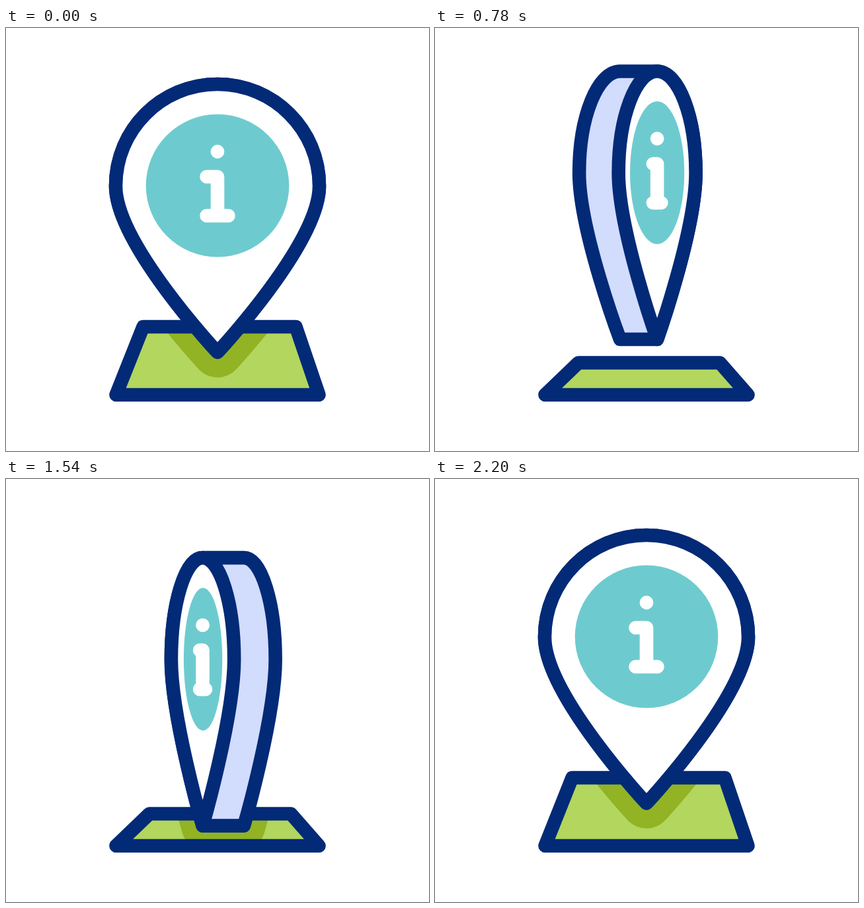
An HTML page with a canvas for the animation above (2400 ms loop, 640 by 640 pixels).

```html
<!DOCTYPE html>
<html lang="en">
<head>
<meta charset="utf-8">
<title>Turning map pin</title>
<style>
html, body { margin: 0; width: 100%; height: 100%; overflow: hidden; background: #fff; }
canvas { display: block; width: 640px; height: 640px; }
</style>
</head>
<body>
<canvas id="stage" width="640" height="640"></canvas>
<script>
const ctx = document.getElementById('stage').getContext('2d');
const LOOP = 2400, HALF = 1200;
const NAVY = '#032a77', TEAL = '#6dcbcf', GREEN = '#b2d65e', SHADE = '#91b324', SIDE = '#d2dcfd';
const TOP = 85, MID = 239, TIP = 490.5, RADIUS = 154, LINE = 20.6;

const mix = (a, b, p) => a + (b - a) * p;

function ease(t, from, to) {
  const p = Math.min(1, Math.max(0, (t - from) / (to - from)));
  return p * p * (3 - 2 * p);
}

// Smooth curve through [time, value] knots, flat at turning points and ends.
function through(knots, t) {
  const last = knots.length - 1;
  if (t <= knots[0][0]) return knots[0][1];
  if (t >= knots[last][0]) return knots[last][1];
  const slope = (i, j) => (knots[j][1] - knots[i][1]) / (knots[j][0] - knots[i][0]);
  const tangent = i => i > 0 && i < last && slope(i - 1, i) * slope(i, i + 1) > 0
    ? slope(i - 1, i + 1) : 0;
  const i = knots.findIndex(k => k[0] > t) - 1;
  const [t0, v0] = knots[i], [t1, v1] = knots[i + 1];
  const d = t1 - t0, u = (t - t0) / d, q = 1 - u;
  return mix(v0, v1, u * u * (3 - 2 * u)) + d * u * q * (q * tangent(i) - u * tangent(i + 1));
}

const FAR_LEFT = [[200, 320], [380, 310.5], [780, 280], [1100, 285], [1200, 290]];
const FAR_RIGHT = [[1200, 346], [1540, 360], [1820, 350], [2200, 320]];

// Drop outline: left half around x = l, right half around x = r.
function drop(l, lw, r, rw) {
  const path = new Path2D(), bend = 0.552, low = 326;
  const shoulder = MID - RADIUS * bend;
  path.moveTo(l, TIP);
  path.bezierCurveTo(l, TIP, l - lw, low, l - lw, MID);
  path.bezierCurveTo(l - lw, shoulder, l - lw * bend, TOP, l, TOP);
  path.lineTo(r, TOP);
  path.bezierCurveTo(r + rw * bend, TOP, r + rw, shoulder, r + rw, MID);
  path.bezierCurveTo(r + rw, low, r, TIP, r, TIP);
  path.closePath();
  return path;
}

function pinAt(t) {
  const first = t < HALF;
  const s = first ? 1 - ease(t, 200, HALF) : ease(t, HALF, 2200);
  const k = 1 - s;
  const wide = RADIUS * s + 10 * k - 83 * s ** 3 * k;
  const thin = 10 * k * (1 - ease(t, HALF, 1540));
  const x = first ? 320 + 26 * k : 320 - 30 * k - 10 * s * s * k;
  const discX = first ? x : 320 - 30 * k;
  const [l, lw, r, rw] = first
    ? [through(FAR_LEFT, t), wide, x, RADIUS * s]
    : [x, wide, through(FAR_RIGHT, t), wide - thin];
  return {
    s, x, discX,
    body: drop(l, lw, r, rw),
    shade: drop(l + 8 * k, lw, r - 8 * k, rw),
    face: first ? drop(x, rw, x, rw) : drop(x, wide, x, wide - 2 * thin)
  };
}

function liftAt(t) {
  if (t < 800) return -19.6 * ease(t, 200, 800);
  if (t < 1600) return mix(-19.6, 35, ease(t, 800, 1600));
  return 35 * (1 - ease(t, 1600, 2200));
}

function outline(path, color, width) {
  ctx.strokeStyle = color;
  ctx.lineWidth = width;
  ctx.stroke(path);
}

function drawGround(t, pin, lift) {
  const p = ease(t, 200, 600) - ease(t, 1800, 2200);
  const y = mix(452, 506.5, p);
  const ground = new Path2D();
  ground.moveTo(166.5, 555);
  ground.lineTo(mix(207.5, 217, p), y);
  ground.lineTo(mix(438.5, 431, p), y);
  ground.lineTo(473.5, 555);
  ground.closePath();

  ctx.fillStyle = GREEN;
  ctx.fill(ground);
  ctx.save();
  ctx.clip(ground);
  ctx.translate(0, lift);
  outline(pin.shade, SHADE, 76.5);
  ctx.restore();
  outline(ground, NAVY, LINE);
}

function drawSign({ s, x, discX }) {
  ctx.fillStyle = TEAL;
  ctx.beginPath();
  ctx.ellipse(discX, 238.5, 108.3 * s, 108, 0, 0, 7);
  ctx.fill();

  ctx.fillStyle = '#fff';
  ctx.beginPath();
  ctx.arc(x, 187, 10.4, 0, 7);
  ctx.fill();

  const arm = 16.5 * s;
  const letter = new Path2D();
  letter.moveTo(x - arm, 225);
  letter.lineTo(x, 225);
  letter.lineTo(x, 284);
  letter.moveTo(x - arm, 284);
  letter.lineTo(x + arm, 284);
  outline(letter, '#fff', LINE);
}

function drawPin(pin, lift) {
  ctx.save();
  ctx.translate(0, lift);
  ctx.fillStyle = SIDE;
  ctx.fill(pin.body);
  outline(pin.body, NAVY, LINE);
  ctx.fillStyle = '#fff';
  ctx.fill(pin.face);
  ctx.save();
  ctx.clip(pin.face);
  drawSign(pin);
  ctx.restore();
  outline(pin.face, NAVY, LINE);
  ctx.restore();
}

function frame() {
  const t = performance.now() % LOOP;
  const pin = pinAt(t), lift = liftAt(t);
  ctx.fillStyle = '#fff';
  ctx.fillRect(0, 0, 640, 640);
  ctx.lineJoin = ctx.lineCap = 'round';
  drawGround(t, pin, lift);
  drawPin(pin, lift);
  requestAnimationFrame(frame);
}
frame();
</script>
</body>
</html>
```
